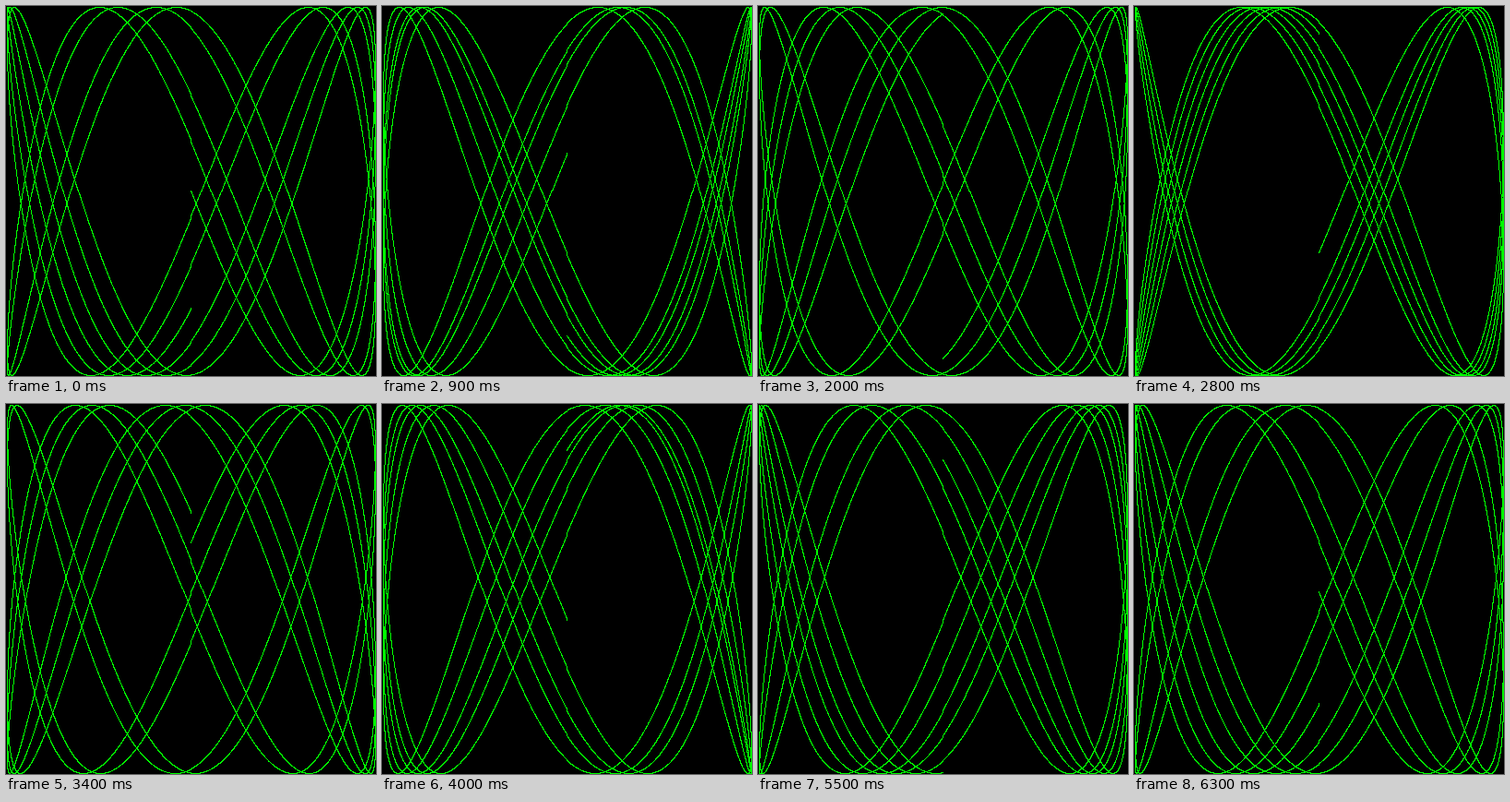
These frames come from a looping animation (401x401 px, 6400 ms). An HTML page with a canvas:

```html
<!DOCTYPE html>
<html lang="en">
<head>
<meta charset="utf-8">
<title>Lissajous</title>
<style>
  html, body { margin: 0; width: 100%; height: 100%; overflow: hidden; background: #000; }
  canvas { display: block; width: 401px; height: 401px; image-rendering: pixelated; }
</style>
</head>
<body>
<canvas id="stage" width="401" height="401"></canvas>
<script>
const R = 200;              // radius; the stage is 2R + 1 pixels wide
const SIDE = 2 * R + 1;
const CYCLES = 5;           // turns of the x oscillator
const STEP = 0.001;         // angular resolution
const FREQ = 2.47821;       // y frequency relative to x
const FRAMES = 64;
const DELAY = 100;
const PHASE_STEP = 0.1;

const ctx = document.getElementById("stage").getContext("2d");
const image = ctx.createImageData(SIDE, SIDE);
const pixels = new DataView(image.data.buffer);
const BLACK = 0x000000ff;
const GREEN = 0x00ff00ff;

// Rounding toward zero gives the small kinks along both centre axes.
const toPixel = v => R + Math.trunc(v * R + 0.5);

function drawCurve(phase) {
  for (let i = 0; i < SIDE * SIDE; i++) pixels.setUint32(i * 4, BLACK);
  for (let t = 0; t < CYCLES * 2 * Math.PI; t += STEP) {
    const x = toPixel(Math.sin(t));
    const y = toPixel(Math.sin(t * FREQ + phase));
    pixels.setUint32((y * SIDE + x) * 4, GREEN);
  }
  ctx.putImageData(image, 0, 0);
}

let start = performance.now();
let shown = -1;

function render(now) {
  const frame = Math.floor(Math.max(0, now - start) / DELAY) % FRAMES;
  if (frame !== shown) {
    shown = frame;
    drawCurve(frame * PHASE_STEP);
  }
}

function tick(now) {
  render(now);
  requestAnimationFrame(tick);
}

render(start);
requestAnimationFrame(tick);
</script>
</body>
</html>
```
